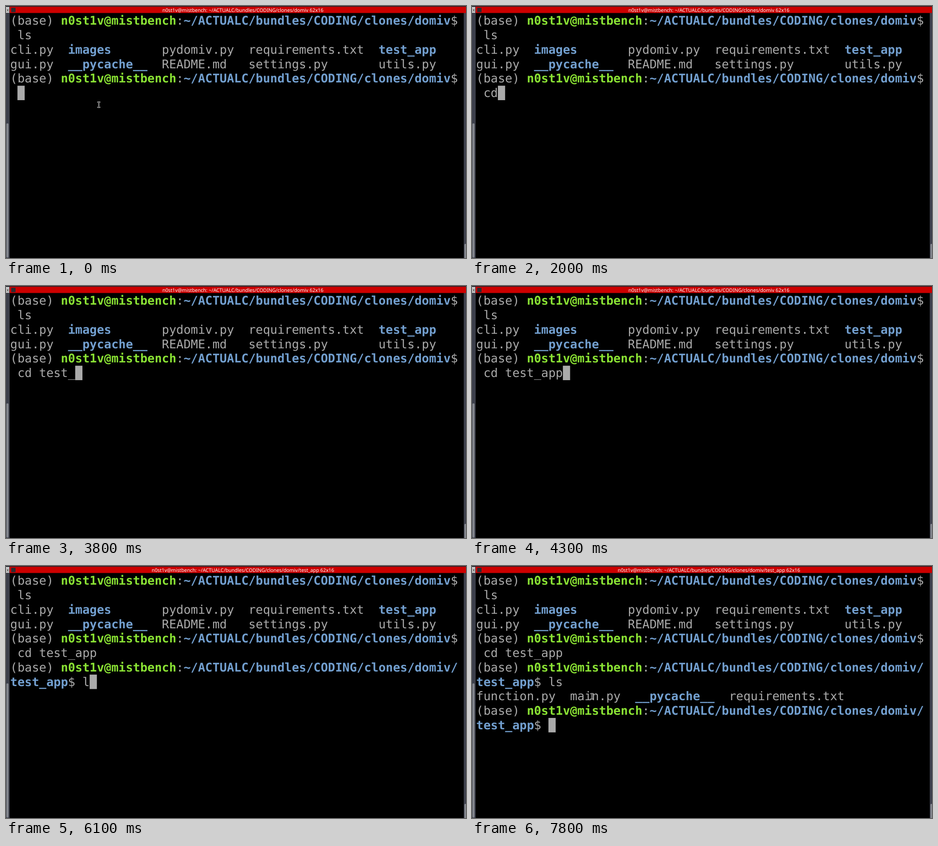
Recreate the animation shown at these times as an HTML page. Size 1011 px wide and 554 px high, loop 8000 ms.

```html
<!DOCTYPE html>
<html lang="en">
<head>
<meta charset="utf-8">
<title>Terminal session</title>
<style>
  html, body { margin: 0; width: 100%; height: 100%; overflow: hidden; background: #000; }
  svg { display: block; width: 100vw; height: 100vh; }
  text { white-space: pre; text-rendering: geometricPrecision; fill: #aaa; }
  .term text { font: 26.36px "DejaVu Sans Mono", monospace; }
  .term .dir, .term .user { font-weight: bold; }
  .term .dir { fill: #729fcf; }
  .term .user { fill: #8ae234; }
  .term .picked { fill: #000; }
  .bar { font: 10.76px "Noto Sans", sans-serif; fill: #fff; text-anchor: middle; }
  .tab { font: 10px "Noto Sans", sans-serif; fill: #333; }
</style>
</head>
<body>
<svg viewBox="0 0 1011 554" preserveAspectRatio="none">
  <rect width="1011" height="554" fill="#3c3f4b"/>
  <rect width="1011" height="2" fill="#23262e"/>
  <rect y="2" width="7" height="13" fill="#c9c9c9"/>
  <text class="tab" x="1" y="12">x</text>
  <rect x="1" y="258" width="4.5" height="295" rx="2" fill="#84878e"/>
  <rect x="1007.5" y="523" width="5" height="33" rx="2" fill="#84878e"/>
  <rect x="8" y="15" width="998" height="539"/>
  <rect x="8" y="1.6" width="1003" height="13.8" fill="#c00"/>
  <rect x="11.5" y="4" width="9.5" height="9.5" fill="#2b2b30"/>
  <text id="bar" class="bar" x="520.7" y="13"></text>
  <g id="term" class="term"></g>
  <defs>
    <path id="beam" d="M-2.2-5.7H-1Q0-5.7 0-4.7V4.7Q0 5.7-1 5.7H-2.2M2.2-5.7H1Q0-5.7 0-4.7M2.2 5.7H1Q0 5.7 0 4.7"/>
  </defs>
  <g id="mouse" fill="none" stroke-linecap="round" stroke-linejoin="round">
    <use href="#beam" stroke="#ddd" stroke-width="2.5"/>
    <use href="#beam" stroke="#000" stroke-width=".9"/>
  </g>
</svg>
<script>
const LOOP = 8000, TICK = 100, BLINK = 600;
const LEFT = 9.3, TOP = 16.5, CELL = 15.87, ROW = 31.75, ASCENT = 24.75;
const USER = 'n0st1v@mistbench';
const HOME = '~/ACTUALC/bundles/CODING/clones/domiv';
const ENTER_CD = 4500, ENTER_LS = 6300;

const [bar, term, mouse] = ['bar', 'term', 'mouse'].map(id => document.getElementById(id));
const colX = col => LEFT + col * CELL;
const rowY = row => TOP + row * ROW;
const show = (el, on) => el.setAttribute('visibility', on ? 'visible' : 'hidden');
const between = (t, from, to) => t >= from && t < to;

function add(parent, tag, attrs = {}) {
  const el = document.createElementNS('http://www.w3.org/2000/svg', tag);
  for (const key in attrs) el.setAttribute(key, attrs[key]);
  return parent.appendChild(el);
}

function put(parent, row, col, str, cls = '') {
  const el = add(parent, 'text', { x: colX(col), y: rowY(row) + ASCENT, class: cls });
  el.textContent = str;
  return el;
}

function block(row, col, cells, fill) {
  return add(term, 'rect', { x: colX(col), y: rowY(row), width: cells * CELL, height: ROW, fill });
}

function prompt(parent, row, inner) {
  let col = 0;
  const next = (str, cls) => {
    put(parent, row, col, str, cls);
    col += str.length;
  };
  next('(base) ');
  next(USER, 'user');
  next(':');
  next(HOME + (inner ? '/' : ''), 'dir');
  if (inner) {
    row++;
    col = 0;
    next('test_app', 'dir');
  }
  next('$');
}

// Lays names out in columns, each as wide as its longest name plus two; "/" marks a folder.
function list(parent, row, columns) {
  let col = 0;
  for (const names of columns) {
    const plain = names.map(name => name.replace('/', ''));
    names.forEach((name, i) => put(parent, row + i, col, plain[i], name.endsWith('/') ? 'dir' : ''));
    col += Math.max(...plain.map(name => name.length)) + 2;
  }
}

const selection = block(2, 51, 8, '#729fcf');
prompt(term, 0, false);
put(term, 1, 1, 'ls');
list(term, 2, [
  ['cli.py', 'gui.py'],
  ['images/', '__pycache__/'],
  ['pydomiv.py', 'README.md'],
  ['requirements.txt', 'settings.py'],
  ['test_app/', 'utils.py']
]);
const folder = [...term.querySelectorAll('.dir')].pop();
prompt(term, 4, false);
const cdLine = put(term, 5, 1, '');

const second = add(term, 'g');
prompt(second, 6, true);
const lsLine = put(second, 7, 10, '');

const listing = add(term, 'g');
list(listing, 8, [['function.py'], ['main.py'], ['__pycache__/'], ['requirements.txt']]);

const third = add(term, 'g');
prompt(third, 9, true);
const caret = block(0, 0, 1, '#aaa');

// Bursts of typing: text, time of the first key, pause between keys
const cdBursts = [['cd', 1900, 100], [' te', 2900, 0], ['st', 3100, 200], ['_', 3800, 0], ['app', 4100, 100]];
const lsBursts = [['ls', 6100, 100]];

const typed = (bursts, t) => bursts.map(([str, at, gap]) =>
  [...str].filter((_, i) => t >= at + i * gap).join('')).join('');

// Pointer glides: start, end, destination
const glides = [
  [0, 500, 993, 105], [500, 700, 907, 100], [1000, 1400, 251.5, 227],
  [5000, 5400, 255.5, 254], [7050, 7300, 301.5, 324], [7400, 7800, 263.5, 286.5]
];

function pointer(t) {
  let x = 204, y = 217;
  for (const [from, to, endX, endY] of glides) {
    const k = Math.min(1, Math.max(0, (t - from) / (to - from)));
    const ease = k * k * (3 - 2 * k);
    x += (endX - x) * ease;
    y += (endY - y) * ease;
  }
  return [x, y];
}

function caretCell(t, cd, ls) {
  if (t >= ENTER_LS + TICK) return [10, 10];
  if (t >= ENTER_LS) return [9, 0];
  return t >= ENTER_CD ? [7, 10 + ls.length] : [5, 1 + cd.length];
}

function caretOn(t) {
  if (between(t, 1900, ENTER_CD)) return true;
  const since = t >= ENTER_LS ? ENTER_LS : t >= ENTER_CD ? ENTER_CD : -500;
  return Math.floor((t - since) / BLINK) % 2 === 0;
}

function draw(time) {
  const t = Math.floor(time / TICK) * TICK;
  const cd = typed(cdBursts, t), ls = typed(lsBursts, t);
  const picked = between(t, 900, 1600);

  bar.textContent = `${USER}: ${HOME}${t >= ENTER_CD + TICK ? '/test_app' : ''} 62x16`;
  cdLine.textContent = cd;
  lsLine.textContent = ls;

  show(selection, picked);
  folder.classList.toggle('picked', picked);
  show(second, t >= ENTER_CD);
  show(listing, t >= ENTER_LS);
  show(third, t >= ENTER_LS + TICK);

  const [row, col] = caretCell(t, cd, ls);
  caret.setAttribute('x', colX(col));
  caret.setAttribute('y', rowY(row));
  show(caret, caretOn(t));

  mouse.setAttribute('transform', `translate(${pointer(t)})`);
  show(mouse, !between(t, 1900, 5300) && !between(t, 6100, 7100));
}

const start = performance.now();
function tick() {
  draw((performance.now() - start) % LOOP);
  requestAnimationFrame(tick);
}
tick();
</script>
</body>
</html>
```
